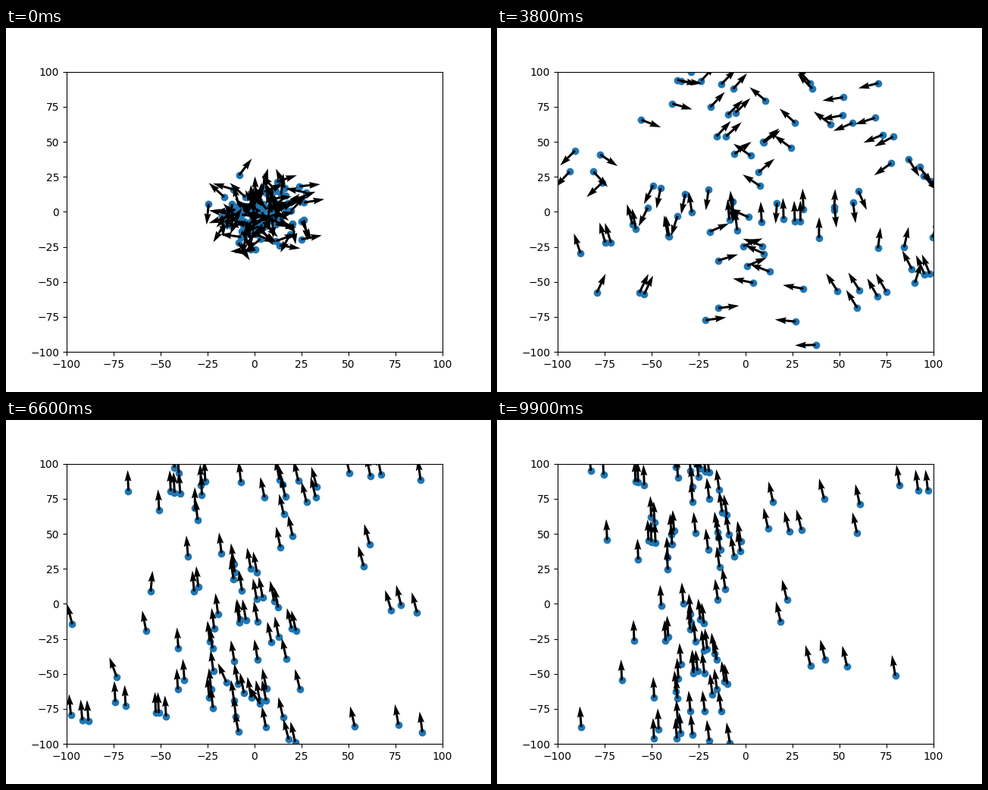
Animation of 640x480 px, one loop 10 s. Source, as a matplotlib script:

```python
import numpy as np
import matplotlib.pyplot as plt
from matplotlib.animation import FuncAnimation

FRAMES, STEP_MS = 100, 100
BIRDS, HALF, SPEED = 100, 100, 5
RING_STEP, TURN_STEP = 14, 24   # outward ring, start of the common turn

# Bearings around the ring against bird rank; flat parts are crowded.
RANKS = [0, 10, 19, 22, 29, 34, 36, 41, 49, 58, 65, 72, 77, 85, 92, 93, 99]
BEARINGS = [-79, -47, -9, 9, 22, 38, 58, 74, 92, 119, 143, 175, 205, 231,
            244, 255, 260]


def wrap(v):
    return (v + HALF) % (2 * HALF) - HALF


def make_ring(rng):
    """Places and headings of the birds once they have spread into a ring."""
    deg = np.interp(np.arange(BIRDS), RANKS, BEARINGS) + rng.normal(0, 1.5, BIRDS)
    bearing = np.radians(deg)
    radius = 75 + 4 * np.cos(bearing) + np.clip(rng.normal(0, 9, BIRDS), -22, 18)
    bend = -13 * np.exp(-((deg - 205) / 22) ** 2)
    heading = np.radians(deg + bend + rng.normal(0, 8, BIRDS))
    return radius * np.cos(bearing), radius * np.sin(bearing), heading


def common(x):
    """Heading the whole flock settles on, varying slightly across the box."""
    return np.radians(98 + 6 * np.sin(np.pi * (x + 10) / HALF))


def fly():
    x, y, heading = make_ring(np.random.default_rng(4))
    x = x - RING_STEP * SPEED * np.cos(heading)
    y = y - RING_STEP * SPEED * np.sin(heading)
    states = []
    for step in range(FRAMES):
        states.append((x, y, np.cos(heading), np.sin(heading)))
        pull = np.clip(0.006 * (step - TURN_STEP), 0, 0.25)
        heading = heading + pull * np.sin(common(x) - heading)
        x = wrap(x + SPEED * np.cos(heading))
        y = wrap(y + SPEED * np.sin(heading))
    return states


states = fly()
fig, ax = plt.subplots(figsize=(6.4, 4.8), dpi=100)
ax.set(xlim=(-HALF, HALF), ylim=(-HALF, HALF))
x, y, u, v = states[0]
dots = ax.scatter(x, y)
arrows = ax.quiver(x, y, u, v, scale=18, width=0.006)


def update(step):
    x, y, u, v = states[step]
    places = np.column_stack([x, y])
    dots.set_offsets(places)
    arrows.set_offsets(places)
    arrows.set_UVC(u, v)
    return dots, arrows


anim = FuncAnimation(fig, update, frames=FRAMES, interval=STEP_MS,
                     repeat=True, repeat_delay=0)
plt.show()
```
